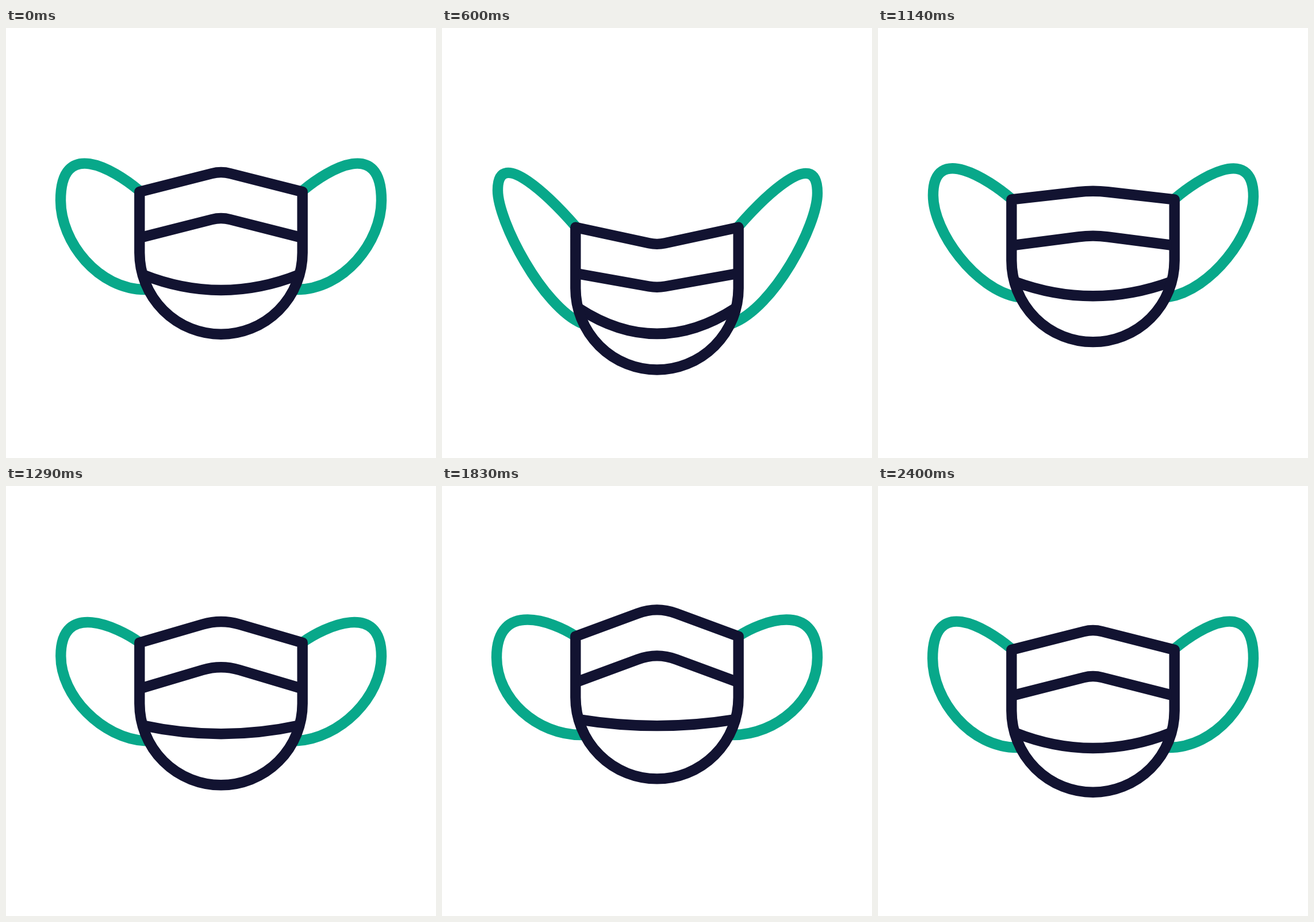
An HTML page with a canvas that plays this animation: 748x748 px, repeating every 2460 ms.

```html
<!DOCTYPE html>
<html lang="en">
<head>
<meta charset="utf-8">
<title>Face mask</title>
<style>
  html, body { margin: 0; width: 100%; height: 100%; overflow: hidden; background: #fff; }
  canvas { display: block; width: 748px; height: 748px; }
</style>
</head>
<body>
<canvas id="stage" width="748" height="748"></canvas>
<script>
const ctx = document.getElementById('stage').getContext('2d');
const SIZE = 748, MID = SIZE / 2, LEFT = 232.3, RADIUS = MID - LEFT;
const LOOP = 2460, STEP = 30, LAST = 2400;
const NAVY = '#121331', GREEN = '#08a88a';

// rise: height of the middle against the corners, before its tip is rounded.
// Straps: two cubic curves, from the top corner to the far side and back;
// the right one is given mirrored.
const restStrap = [232, 283, 185, 244, 95, 192, 95, 300, 95, 372, 160, 455, 243, 455];
const upStrap = [232, 259, 194, 235, 95, 198.5, 95, 298, 95, 370, 165, 431, 243, 431];

const rest = {
  corner: 285, roundX: 358, topRise: -36, foldRise: -36,
  curveEnd: 429, curveMid: 456,
  leftStrap: restStrap, rightStrap: restStrap
};
const down = {
  corner: 348, roundX: 360, topRise: 32, foldRise: 26.5,
  curveEnd: 489, curveMid: 533.5,
  leftStrap: [232, 346, 192, 300, 97, 203, 97, 282, 97, 335, 175, 485, 243, 515],
  rightStrap: [232, 346, 192, 300, 95, 201, 95, 287, 95, 343, 171, 487, 243, 515]
};
const up = {
  corner: 259.5, roundX: 339, topRise: -54, foldRise: -54,
  curveEnd: 404, curveMid: 413.5,
  leftStrap: upStrap, rightStrap: upStrap
};

const moves = [
  { start: 0, end: 720, from: rest, to: down, ease: [0.4, 0.27] },
  { start: 720, end: 1620, from: down, to: up, ease: [0.55, 0.3] },
  { start: 1620, end: LAST, from: up, to: rest, ease: [0.6, 0.57] }
];

const lerp = (a, b, p) => a + (b - a) * p;

// Cubic timing curve with flat ends; x1 and x2 are the handle times.
function ease(x, [x1, x2]) {
  let lo = 0, hi = 1;
  for (let i = 0; i < 30; i++) {
    const u = (lo + hi) / 2, v = 1 - u;
    if (3 * u * v * v * x1 + 3 * u * u * v * x2 + u * u * u < x) lo = u;
    else hi = u;
  }
  return lo * lo * (3 - 2 * lo);
}

function poseAt(time) {
  const move = moves.find(m => time <= m.end);
  const p = ease((time - move.start) / (move.end - move.start), move.ease);
  const pose = {};
  for (const key in rest) {
    const a = move.from[key], b = move.to[key];
    pose[key] = Array.isArray(a) ? a.map((v, i) => lerp(v, b[i], p)) : lerp(a, b, p);
  }
  return pose;
}

function stroke(color, trace) {
  ctx.strokeStyle = color;
  ctx.beginPath();
  trace();
  ctx.stroke();
}

function strap(points) {
  stroke(GREEN, () => {
    ctx.moveTo(points[0], points[1]);
    ctx.bezierCurveTo(...points.slice(2, 8));
    ctx.bezierCurveTo(...points.slice(8, 14));
  });
}

function ridge(endY, rise, roundX) {
  const roundY = endY + rise * (roundX - LEFT) / RADIUS;
  ctx.moveTo(LEFT, endY);
  ctx.lineTo(roundX, roundY);
  ctx.quadraticCurveTo(MID, endY + rise, SIZE - roundX, roundY);
  ctx.lineTo(SIZE - LEFT, endY);
}

function draw(pose) {
  const { corner, roundX, topRise, foldRise, curveEnd, curveMid } = pose;
  ctx.fillStyle = '#fff';
  ctx.fillRect(0, 0, SIZE, SIZE);
  ctx.lineWidth = 18.4;
  ctx.lineJoin = 'round';

  strap(pose.leftStrap);
  strap(pose.rightStrap.map((v, i) => i % 2 ? v : SIZE - v));

  stroke(NAVY, () => ridge(corner + 80, foldRise, roundX));
  stroke(NAVY, () => {
    ctx.moveTo(238, curveEnd);
    ctx.quadraticCurveTo(MID, 2 * curveMid - curveEnd, SIZE - 238, curveEnd);
  });
  stroke(NAVY, () => {
    ridge(corner, topRise, roundX);
    ctx.arc(MID, corner + 106, RADIUS, 0, Math.PI);
    ctx.closePath();
  });
}

function frame() {
  const time = performance.now() % LOOP;
  draw(poseAt(Math.min(LAST, Math.floor(time / STEP) * STEP)));
  requestAnimationFrame(frame);
}
frame();
</script>
</body>
</html>
```
